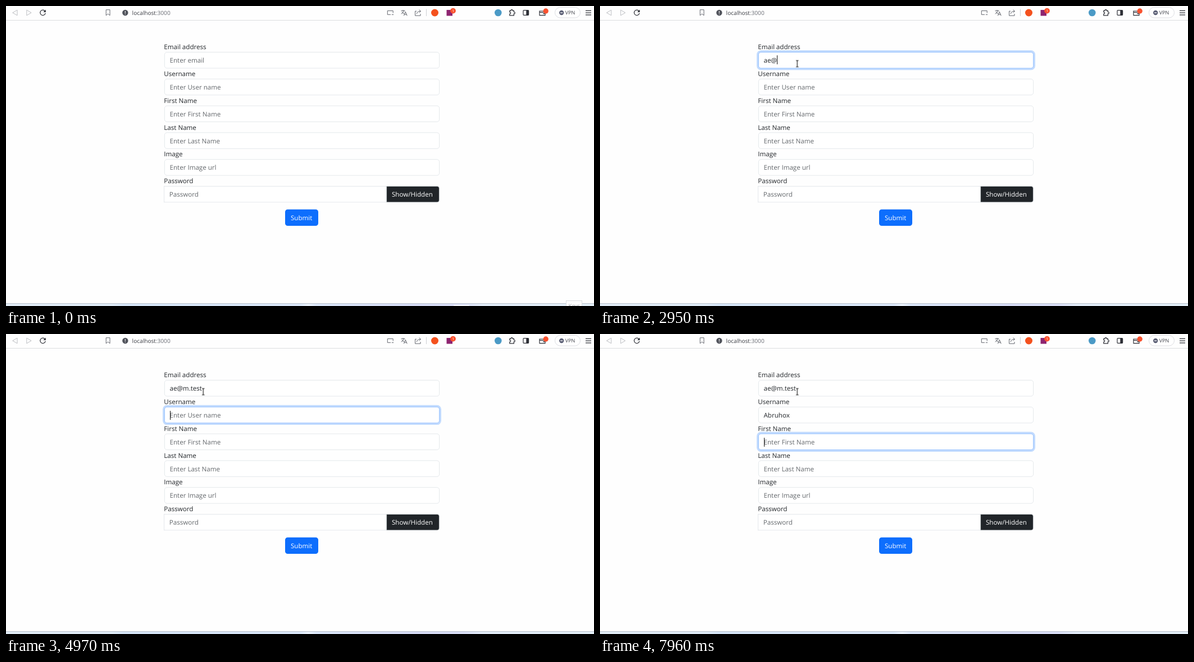
Animation of 1047 by 535 pixels, one loop 8000 ms. Source, as an HTML page:

```html
<!DOCTYPE html>
<html lang="en">
<head>
<meta charset="utf-8">
<title>Sign-up form</title>
<style>
html, body { margin: 0; width: 100%; height: 100%; overflow: hidden; background: #fefefe; }
svg { display: block; }
text { font: 11.6px "Open Sans", "Noto Sans", sans-serif; fill: #212529; text-rendering: geometricPrecision; white-space: pre; }
.hint { fill: #64686c; }
.light { fill: #fff; }
.small { font-size: 9.6px; fill: #41434b; }
.url { font-size: 10.1px; fill: #3b3d44; }
.field { fill: #fff; stroke: #dee2e6; stroke-width: .8; }
.field.on { stroke: #86b7fe; }
.ring { fill: #c2dbfe; }
.line { fill: none; stroke: #62656d; }
.pale { stroke: #bcbec2; }
.dark { stroke: #2d2f36; stroke-width: 1.2; }
.popup { filter: drop-shadow(0 1px 1.5px rgba(0, 0, 0, .28)); fill: #fff; }

/* page furniture that disappears early in the loop */
.tip { animation: tip 8s step-end infinite; }
.glow { animation: glow 8s step-end infinite; }
@keyframes tip { 0% { opacity: 1 } 4.125%, 100% { opacity: 0 } }
@keyframes glow { 0% { opacity: 1 } 24.5%, 100% { opacity: 0 } }

/* mouse pointer: appears, jumps to the label, then rests in the first field */
.mouse { animation: mouse 8s step-end infinite; }
@keyframes mouse {
  0% { opacity: 0; transform: translate(464.5px, 157px) }
  7.875% { opacity: 1; transform: translate(464.5px, 157px) }
  12% { opacity: 1; transform: translate(346.5px, 66px) }
  16.125%, 100% { opacity: 1; transform: translate(351.2px, 96.5px) }
}
</style>
</head>
<body>
<svg width="1047" height="535" viewBox="0 0 1047 535">
  <defs>
    <linearGradient id="bar">
      <stop offset="0" stop-color="#e1ecf6"/>
      <stop offset=".18" stop-color="#dfebf7"/>
      <stop offset=".2" stop-color="#d5e5f7"/>
      <stop offset=".5" stop-color="#dae7f9"/>
      <stop offset=".514" stop-color="#ecf3fc"/>
      <stop offset=".528" stop-color="#dae6f9"/>
      <stop offset=".7" stop-color="#d5daf4"/>
      <stop offset=".78" stop-color="#d9def6"/>
      <stop offset=".81" stop-color="#e2ecf8"/>
      <stop offset="1" stop-color="#e2eef7"/>
    </linearGradient>
  </defs>
  <rect width="1047" height="535" fill="#fefefe"/>

  <!-- browser bar -->
  <rect y="25" width="1047" height="1" fill="#dcdde0"/>
  <path class="line pale" d="M20 7.2V16.8L11.8 12ZM36.8 7.2V16.8L45 12Z"/>
  <path class="line dark" d="M69.4 9.2A4.7 4.7 0 1 0 70.2 12.6"/>
  <path d="M70.8 6.6V11H66.4Z" fill="#2d2f36"/>
  <path class="line" d="M178.2 6.7H185V16.8L181.6 14L178.2 16.8Z"/>
  <circle cx="212.3" cy="12" r="5.2" fill="#50535b"/>
  <path d="M212.3 9V12.6M212.3 13.7V14.9" stroke="#fff" stroke-width="1.1"/>
  <text class="url" x="224.6" y="15.6">localhost<tspan fill="#686b73">:3000</tspan></text>

  <path class="line" d="M685 15.3H679.3V8.5H689.2V12.5M686.8 15.3H690.2"/>
  <path class="line" d="M703.5 8.3H710.5M707 7V8.3M709 8.3Q708 12 703.6 14M705 10Q706.5 13 709 14M708.4 17.3L711.3 10.3L714.2 17.3M709.4 15H713.2"/>
  <path class="line" d="M731 9.2H728.6V17.2H738V14M731.4 14Q731.7 9.5 738.2 9.3M735.7 6.6L738.5 9.3L735.7 12"/>
  <path d="M748.5 5.5V18" stroke="#cfd0d4"/>
  <circle cx="763.5" cy="12" r="6.5" fill="#f4511e"/>
  <rect x="784.5" y="7" width="10.5" height="10.5" fill="#8e2470"/>
  <circle cx="796" cy="8.6" r="4.9" fill="#f9522f"/>
  <text class="light" x="794.3" y="11" style="font-size:6.5px">1</text>

  <circle cx="876.3" cy="12" r="6.3" fill="#4b9ac6"/>
  <path class="line dark" d="M896.8 8.4H899.2Q898.8 6.3 900.6 6.3Q902.4 6.3 902 8.4H904.4V10.8Q906.3 10.5 906.3 12.3Q906.3 14 904.4 13.7V16.8H896.8V14Q898.7 14 898.7 12.4Q898.7 10.8 896.8 10.9Z"/>
  <rect class="line dark" x="921" y="7.7" width="9.6" height="8.6" rx="1"/>
  <path d="M926.3 7.7H930.6V16.3H926.3Z" fill="#2d2f36"/>
  <path class="line dark" d="M950 9H960V16.7H950ZM950 11.3H960M956 13.7H960"/>
  <circle cx="961.2" cy="9" r="4.7" fill="#f9522f"/>
  <rect x="977.5" y="2.5" width="45" height="18.5" rx="9.2" fill="#fff" stroke="#dcdde2"/>
  <circle cx="989.2" cy="12" r="4.2" fill="#5b5f75"/>
  <path d="M987 12H991.4" stroke="#fff" stroke-width="1.2"/>
  <text class="small" x="995.8" y="15.2" style="font-size:9px">VPN</text>
  <path class="line dark" d="M1032 8.3H1042M1032 12.1H1042M1032 15.9H1042"/>

  <!-- form -->
  <g id="form"></g>
  <path class="field" style="fill:#212529" d="M677.6 321.4H767.2Q771.4 321.4 771.4 325.6V345.7Q771.4 349.9 767.2 349.9H677.6Z"/>
  <text class="light" x="687" y="340.4">Show/Hidden</text>
  <rect x="497" y="362.7" width="59" height="29.3" rx="4.6" fill="#0d6efd"/>
  <text class="light" x="507" y="382">Submit</text>

  <!-- taskbar edge -->
  <rect y="530" width="1047" height="1" fill="#b9c0ca"/>
  <rect y="531" width="1047" height="4" fill="url(#bar)"/>
  <rect class="glow" x="797" y="533" width="28" height="2" rx="1" fill="#f3f6fc"/>
  <g class="tip">
    <rect x="997.5" y="525.5" width="28" height="12" fill="#fdfdfd" stroke="#dadde1"/>
    <text class="small" x="1001.5" y="538" style="fill:#a3a8b0">Keys</text>
  </g>

  <g id="popup"></g>
  <rect id="caret" width="1" height="16" fill="#111"/>
  <path class="mouse" fill="none" stroke="#111" stroke-width="1.1" d="M-2.3 .8H-.6L0 1.4L.6 .8H2.3M0 1.4V11.4M-2.3 12H-.6L0 11.4L.6 12H2.3"/>
</svg>
<script>
const LOOP = 8000;
const MAIL = 'ae@m.test', USER = 'Abruhox';
const ROWS = [
  ['Email address', 'Enter email'],
  ['Username', 'Enter User name'],
  ['First Name', 'Enter First Name'],
  ['Last Name', 'Enter Last Name'],
  ['Image', 'Enter Image url'],
  ['Password', 'Password']
];
// start time, focused row, typed letters, suggestions, caret shown
const STEPS = [
  [0, -1, 0, [], 0],
  [1960, 0, 0, ['bexo@m.test'], 1],
  [2300, 0, 1, [], 1],
  [2630, 0, 2, [], 1],
  [2950, 0, 3, [], 1],
  [3310, 0, 4, [], 1],
  [3970, 0, 5, [], 1],
  [4310, 0, 6, [], 1],
  [4650, 0, 9, [], 1],
  [4970, 1, 0, [], 1],
  [5300, 1, 0, [], 0],
  [5970, 1, 0, [], 1],
  [6310, 1, 1, ['abruhox', 'avuavu'], 1],
  [6640, 1, 4, ['abruhox'], 1],
  [6970, 1, 6, ['abruhox'], 1],
  [7300, 1, 7, ['abruhox'], 1],
  [7630, 1, 7, ['abruhox'], 0],
  [7960, 2, 0, [], 1]
];

const form = document.getElementById('form');
const popup = document.getElementById('popup');
const caret = document.getElementById('caret');

function add(parent, tag, attrs, text = '') {
  const el = document.createElementNS('http://www.w3.org/2000/svg', tag);
  for (const key in attrs) el.setAttribute(key, attrs[key]);
  el.textContent = text;
  return parent.appendChild(el);
}

const rowTop = i => 82 + 47.8 * i;

const fields = ROWS.map(([label, hint], i) => {
  const y = rowTop(i), last = i === 5;
  const ring = add(form, 'rect', { class: 'ring', x: 279, y: y - 3, width: 496, height: 35.3, rx: 7.5 });
  add(form, 'text', { x: 281.3, y: y - 4.9 }, label);
  const box = add(form, 'rect', last
    ? { x: 281.5, y: y + .4, width: 396.1, height: 28.5 }
    : { x: 282.4, y: y + .4, width: 489.2, height: 28.5, rx: 4.3 });
  const text = add(form, 'text', { x: last ? 290.8 : 291.5, y: y + 19.2 });
  return { hint, ring, box, text };
});

function drawPopup(row, items) {
  popup.textContent = '';
  if (!items.length) return;
  const y = rowTop(row) + 35.5, bottom = y + 7 + 27.8 * items.length;
  add(popup, 'path', {
    class: 'popup',
    d: `M362.5 ${y}H368.5L373.5 ${y - 5}L378.5 ${y}H473Q478 ${y} 478 ${y + 5}V${bottom - 5}` +
       `Q478 ${bottom} 473 ${bottom}H362.5Q357.5 ${bottom} 357.5 ${bottom - 5}V${y + 5}Q357.5 ${y} 362.5 ${y}Z`
  });
  items.forEach((s, i) => add(popup, 'text', { class: 'small', x: 366.5, y: y + 21 + 27.8 * i }, s));
}

function show([, row, typed, items, blink]) {
  const values = [MAIL, USER].map((s, i) => i < row ? s : i === row ? s.slice(0, typed) : '');
  fields.forEach((f, i) => {
    const value = values[i] || '';
    f.ring.style.display = i === row ? '' : 'none';
    f.box.setAttribute('class', i === row ? 'field on' : 'field');
    f.text.textContent = value || f.hint;
    f.text.setAttribute('class', value ? '' : 'hint');
  });
  drawPopup(row, items);
  caret.style.display = blink ? '' : 'none';
  if (blink) {
    const width = typed ? fields[row].text.getComputedTextLength() : 0;
    caret.setAttribute('x', Math.round(291.7 + width));
    caret.setAttribute('y', Math.round(rowTop(row)) + (typed ? 6 : 7));
  }
}

// keep the CSS keyframes on the same clock as the script
const clock = document.getAnimations();
clock.forEach(a => a.pause());

let current;
function tick() {
  const t = performance.now() % LOOP;
  clock.forEach(a => { a.currentTime = t; });
  const step = STEPS.findLast(s => s[0] <= t);
  if (step !== current) show(current = step);
  requestAnimationFrame(tick);
}
tick();
</script>
</body>
</html>
```
